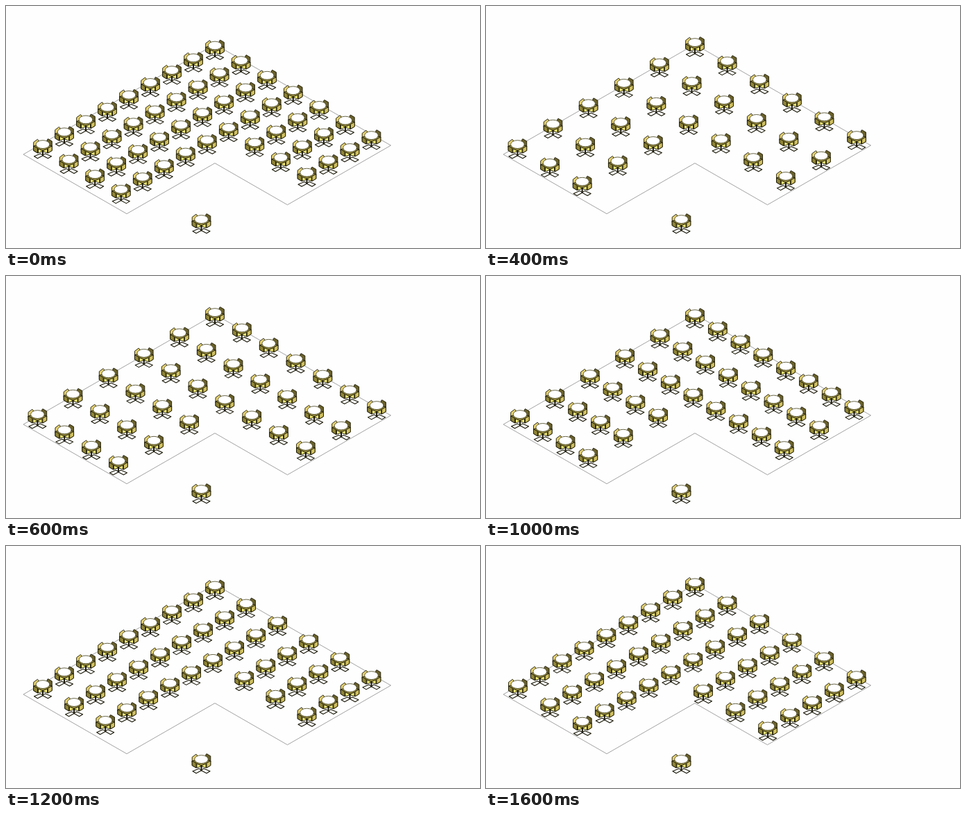
Animation, 683 px wide and 349 px high, one loop 1.8 s. Source, as an HTML page:

```html
<!DOCTYPE html>
<html lang="en">
<head>
<meta charset="utf-8">
<title>Table layouts</title>
<style>
  html, body { margin: 0; width: 100%; height: 100%; overflow: hidden; background: #fefefe; }
  svg { display: block; width: 683px; height: 349px; }
  .layout { visibility: hidden; }
  .layout.on { visibility: visible; }
</style>
</head>
<body>
<svg viewBox="0 0 683 349">
  <defs>
    <g id="table" stroke="#1a1808" stroke-width=".9" stroke-linejoin="round">
      <g fill="#fff" stroke-width="1.1">
        <path d="M-3.5 9L-12.5 12.8L-7.5 15.8L.5 11.4Z"/>
        <path d="M3.5 9L12.5 12.8L7.5 15.8L-.5 11.4Z"/>
      </g>
      <path d="M-13.3 -7.5L-7.5 -11.8L-6.3 -10.5V-4L-13.3 0Z" fill="#e6d270"/>
      <path d="M13.3 -9L7.5 -12.4L6.3 -11V-5L13.3 -1Z" fill="#6a612a"/>
      <path d="M-13.3 -2L-10 -3H10L13.3 -2V4.5L7.5 8L4 6H-4L-7.5 8L-13.3 4.5Z" fill="#90853a"/>
      <path d="M-13.3 -2L-7.5 1V8L-13.3 4.5Z" fill="#8f8436"/>
      <path d="M13.3 -2L7.5 1V8L13.3 4.5Z" fill="#d0c060"/>
      <path d="M-6.5 2L0 5L6.5 2V8L0 5.5L-6.5 8Z" fill="#faf27a"/>
      <path d="M0 4V12" stroke-width="2"/>
      <ellipse cy="-4.4" rx="9.8" ry="5.9" fill="#fff" stroke="#55522f"/>
    </g>
  </defs>
  <path id="room" fill="none" stroke="#999" stroke-width=".9"/>
  <use href="#table" x="281.5" y="312"/>
</svg>
<script>
const STEP = 200;
const WIDTH = 253.5, DEPTH = 276, WING = 149;   // L-shaped room
const LIFT = 10;                                // table centre above the floor
const LAYOUTS = [
  { cols: 6, rows: 8, margin: 14, hold: 1 },
  { cols: 5, rows: 5, margin: 10.2, hold: 2 },
  { cols: 6, rows: 5, margin: 10.2, hold: 2 },
  { cols: 7, rows: 5, margin: 12, hold: 1 },
  { cols: 5, rows: 8, margin: 14, hold: 1 },
  { cols: 5, rows: 8, margin: 10.4, hold: 2 }
];
const svg = document.querySelector('svg');
const iso = (a, b) => [301 + a - b, 55.3 + (a + b) * 0.575];

function add(tag, parent, attrs) {
  const el = document.createElementNS('http://www.w3.org/2000/svg', tag);
  for (const key in attrs) el.setAttribute(key, attrs[key]);
  return parent.appendChild(el);
}

const corners = [[0, 0], [WIDTH, 0], [WIDTH, WING], [WING, WING], [WING, DEPTH], [0, DEPTH]];
document.getElementById('room').setAttribute('d', `M${corners.map(c => iso(...c)).join('L')}Z`);

// An even grid inside the margin, minus the cut-out corner.
function build({ cols, rows, margin }) {
  const g = add('g', svg, { class: 'layout' });
  const limit = WING - margin + 0.5;
  for (let i = 0; i <= cols; i++) {
    for (let j = 0; j <= rows; j++) {
      const a = margin + i * (WIDTH - 2 * margin) / cols;
      const b = margin + j * (DEPTH - 2 * margin) / rows;
      if (a > limit && b > limit) continue;
      const [x, y] = iso(a, b);
      add('use', g, { href: '#table', x, y: y - LIFT });
    }
  }
  return g;
}

const steps = LAYOUTS.flatMap(layout => Array(layout.hold).fill(build(layout)));
const groups = new Set(steps);
const start = performance.now();

function draw(now) {
  const index = Math.floor(Math.max(0, now - start) / STEP) % steps.length;
  for (const g of groups) g.classList.toggle('on', g === steps[index]);
  requestAnimationFrame(draw);
}
draw(start);
</script>
</body>
</html>
```
